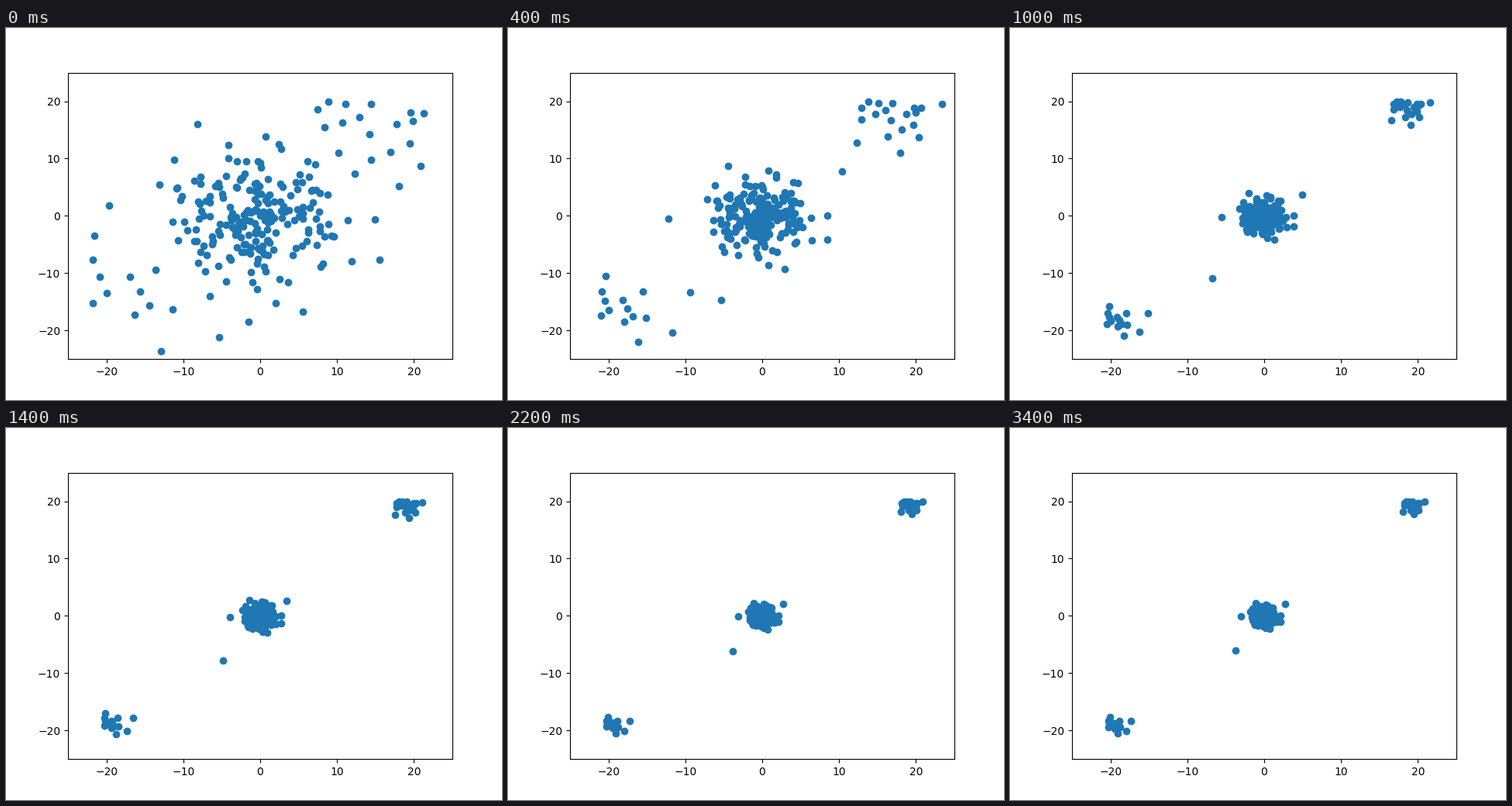
Animation, 640 px wide and 480 px high, one loop 4000 ms. Source, as a matplotlib script:

```python
import numpy as np
import matplotlib.pyplot as plt
from matplotlib.animation import FuncAnimation

STEPS, INTERVAL = 20, 200
MODES = np.array([(-20, -20), (0, 0), (20, 20)])
MODE_STD = 0.95       # spread left around each mode
NOISE, COOLING = 7.0, 0.73

# Evenly spaced runs of points on the way to the corners: start, end, count
RUNS = [
    ((7.5, 18.6), (8.9, 20.0), 2), ((11.1, 19.6), (14.4, 19.5), 2),
    ((8.4, 15.5), (12.9, 17.2), 3), ((14.2, 14.2), (21.3, 17.9), 3),
    ((14.4, 9.8), (19.5, 12.6), 3), ((19.6, 18.0), (19.9, 16.5), 2),
    ((-21.8, -7.7), (-20.0, -13.5), 3), ((-16.9, -10.6), (-14.4, -15.7), 3),
    ((-16.3, -17.3), (-11.4, -16.3), 2),
]
# Lone points that stand out
LONERS = [
    (26.2, 19.2), (20.9, 8.7), (18.0, 5.2), (10.2, 11.0), (12.3, 7.3),
    (-21.6, -3.5), (-21.8, -15.3), (-12.9, -23.6), (-5.3, -21.2),
    (-13.6, -9.4), (-6.6, -14.0), (-1.5, -18.498),
    (-19.7, 1.8), (15.5, -7.7), (5.5, -16.7), (-8.2, 16.0),
]


def middle_cloud(count=208):
    rng = np.random.default_rng(7)
    pts = rng.normal((-0.3, 0.4), 6.0, (count * 2, 2))
    near = (np.hypot(*pts.T) < 15.5) & (abs(pts.sum(axis=1)) < 17)
    return pts[near][:count]


def variance(step):
    return (NOISE * COOLING ** step) ** 2 + MODE_STD ** 2


def pull(pts, step):
    """Contract every point towards its softly weighted mode."""
    var = variance(step)
    dist = ((pts[:, None] - MODES) ** 2).sum(axis=2)
    weight = np.exp((dist.min(axis=1, keepdims=True) - dist) / (2 * var))
    goal = weight @ MODES / weight.sum(axis=1, keepdims=True)
    return goal + (pts - goal) * np.sqrt(variance(step + 1) / var)


runs = [np.linspace(a, b, n) for a, b, n in RUNS]
path = [np.vstack([middle_cloud(), *runs, LONERS])]
for step in range(STEPS - 1):
    path.append(pull(path[-1], step))

fig, ax = plt.subplots(figsize=(6.4, 4.8), dpi=100)
ax.set(xlim=(-25, 25), ylim=(-25, 25))
ax.set_xticks(range(-20, 21, 10))
ax.set_yticks(range(-20, 21, 10))
dots = ax.scatter(*path[0].T, s=36, color="#1f77b4")


def update(step):
    dots.set_offsets(path[step])
    return (dots,)


anim = FuncAnimation(fig, update, frames=STEPS, interval=INTERVAL,
                     repeat=True, repeat_delay=0)
plt.show()
```
